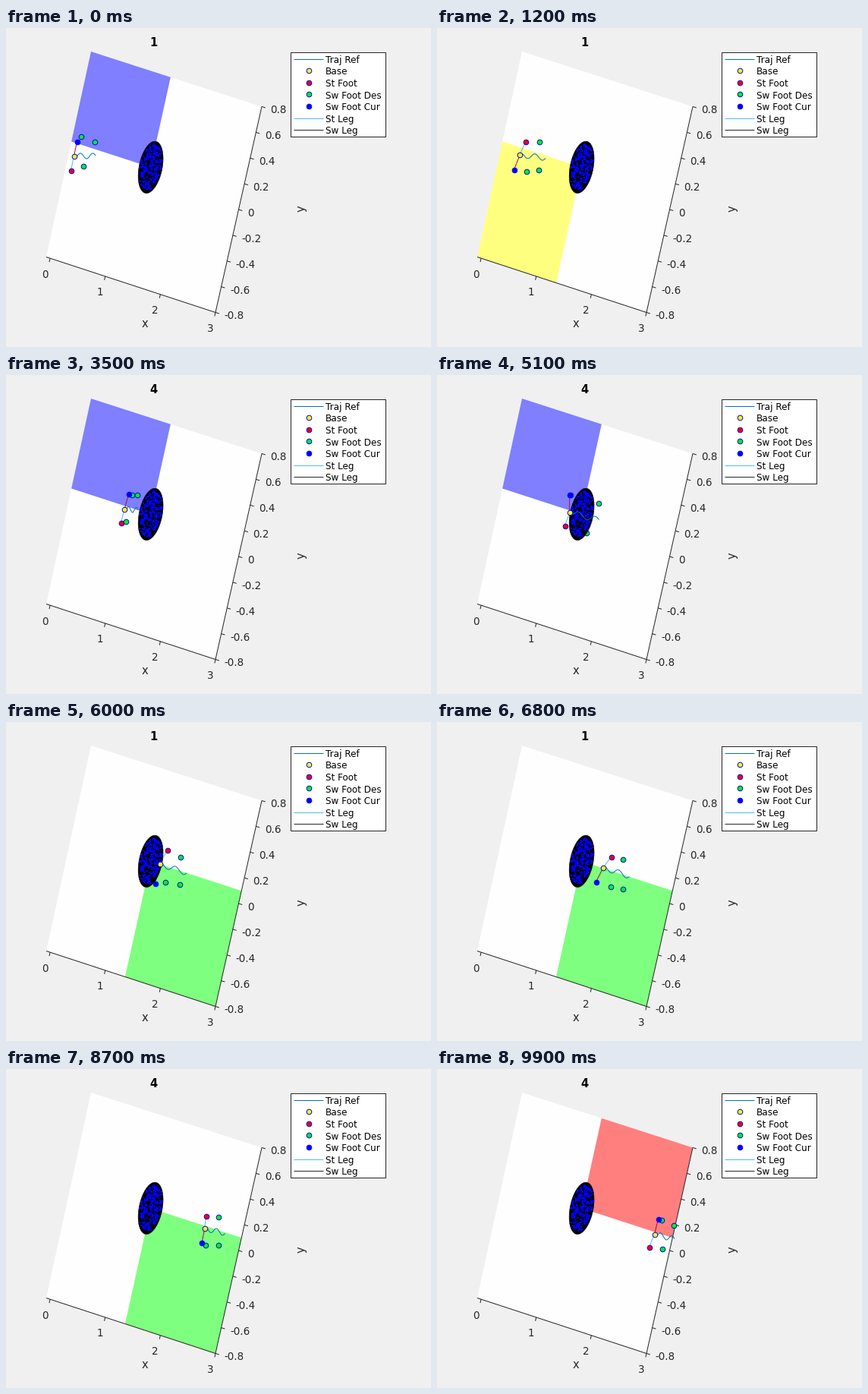
Write a matplotlib script that moves like this. It is 560 px wide and 420 px high and loops after 10 s.

```python
import numpy as np
import matplotlib.pyplot as plt
from matplotlib.animation import FuncAnimation
from matplotlib.patches import Polygon, Rectangle

W, H, DPI = 560, 420, 100
PT = 72 / DPI  # points per pixel
FRAMES, PHASES = 100, 4

plt.rcParams["font.family"] = "DejaVu Sans"
fig = plt.figure(figsize=(W / DPI, H / DPI), dpi=DPI, facecolor="#f0f0f0")
ax = fig.add_axes([0, 0, 1, 1])
ax.set_xlim(0, W)
ax.set_ylim(H, 0)
ax.axis("off")

INK = "#262626"
TRAJ, ST_LEG, SW_LEG = "#0072bd", "#4dbeee", "#a2142f"

# Ground plane corners on the stage
BL, BR, TR, TL = map(np.array, [(53, 301.5), (276, 374.5), (337, 103.5), (112, 31)])
SPLIT_U, SPLIT_V = 0.466, 0.562


def plane(u, v):
    return (1 - v) * ((1 - u) * BL + u * BR) + v * ((1 - u) * TL + u * TR)


def quad(u0, u1, v0, v1):
    return [plane(u0, v0), plane(u1, v0), plane(u1, v1), plane(u0, v1)]


def line(pts, color, lw=1.0, z=2):
    return ax.plot(*np.transpose(pts), color=color, lw=lw * PT, zorder=z,
                   solid_capstyle="butt")[0]


def text(x, y, s, px, ha="center", **kw):
    return ax.text(x, y + 0.365 * px, s, fontsize=px * PT, ha=ha,
                   va="baseline", color=kw.pop("color", INK), **kw)


def dots(color, z, xy=((0, 0),)):
    x, y = np.transpose(xy)
    return ax.plot(x, y, "o", ms=6.6 * PT, mfc=color, mec="#0000ff",
                   mew=1.0 * PT, zorder=z)[0]


# Ground, axes and ticks
ax.add_patch(Polygon(quad(0, 1, 0, 1), fc="#fefefe", ec="none", zorder=0))
region = ax.add_patch(Polygon(quad(0, 1, 0, 1), ec="none", zorder=1))
line([BL, BR, TR], INK)
for x in range(4):
    p = plane((x + 0.07) / 3.07, 0)
    line([p, p + (-1.1, 4.9)], INK)
    text(p[0] - 7, p[1] + 20.5, str(x), 13.5)
for n in range(-4, 5):
    p = plane(1, (n + 4) / 8)
    line([p, p + (4.8, 1.5)], INK)
    text(p[0] + 11.5, p[1] + 4, f"{n / 5:g}", 13.5, ha="left")
text(183, 388.5, "x", 14.7)
ax.text(389, 238, "y", fontsize=14.7 * PT, rotation=90, ha="center",
        va="center", color=INK)
title = text(194, 19, "1", 14.7, weight="bold", color="black")

# Meshed ball seen from above
center = plane(SPLIT_U, SPLIT_V)
EX, EY = np.array([14.6, 4.7]), np.array([7.6, -33.9])


def disc(r, a):
    return center + np.outer(r * np.cos(a), EX) + np.outer(r * np.sin(a), EY)


rng = np.random.default_rng(5)
ring = disc(np.ones(60), np.linspace(0, 2 * np.pi, 60))
ax.add_patch(Polygon(ring, fc="black", ec="black", lw=0.5 * PT, zorder=5))
spots = disc(0.9 * np.sqrt(rng.random(210)), 2 * np.pi * rng.random(210))
ax.scatter(*spots.T, s=(rng.uniform(1.5, 3.2, 210) * PT) ** 2, marker="s",
           c="#0000ff", linewidths=0, zorder=5.1)

# Legend
ax.add_patch(Rectangle((374.5, 31.5), 125, 111, fc="white", ec=INK, lw=PT, zorder=8))
ENTRIES = [("Traj Ref", TRAJ, 0), ("Base", "yellow", 1), ("St Foot", "red", 1),
           ("Sw Foot Des", "lime", 1), ("Sw Foot Cur", "blue", 1),
           ("St Leg", ST_LEG, 0), ("Sw Leg", INK, 0)]
for n, (name, color, is_dot) in enumerate(ENTRIES):
    y = 40.5 + 15.6 * n
    if is_dot:
        dots(color, 9, [(398.5, y)])
    else:
        line([(379, y), (418, y)], color, z=9)
    text(421, y + 1, name, 12, ha="left", color="black", zorder=9)

# Footholds, upper and lower in turn; the first two are the starting pose
HOLDS = np.array([
    (93, 149), (85, 187), (98, 142), (101, 186), (116, 149), (117, 188),
    (134, 149), (133, 189), (150, 153), (151, 194), (165, 157), (157, 197),
    (172, 157), (168, 198), (175, 157), (196, 212), (212, 168), (209, 210),
    (229, 177), (228, 216), (244, 180), (244, 222), (263, 193), (262, 231),
    (279, 194), (279, 234), (295, 198), (296, 241), (311, 205)], float) + 0.5
CROSSING = 13  # first step on the far side
LEAD_T = [0, 24, 35, 51, 60, 76, 99]
LEAD_X = [0, 0.5, -0.5, 3, -2, 1, 1]
LEAD_Y = [0, 2, 1, 3, 3.5, 1, 1.5]

st_leg = line([(0, 0), (0, 0)], ST_LEG, z=3)
sw_leg = line([(0, 0), (0, 0)], SW_LEG, z=3)
st_foot = dots("red", 4)
des_feet = dots("lime", 4.1)
sw_foot = dots("blue", 4.2)
traj = line([(0, 0), (0, 0)], TRAJ, z=6)
base_dot = dots("yellow", 6.1)
u = np.linspace(0, 1, 50)
SWAY = 3.6 * np.minimum(1, 6 * u) * np.sin(2 * np.pi * u / 0.57 - 1.74)


def place(artist, pts):
    artist.set_data(*np.transpose(pts))


def update(i):
    step, phase = divmod(i, PHASES)
    upper = step % 2 == 0  # the upper foot swings
    far = step >= CROSSING
    side = 1 if upper else -1

    old, stance, target = HOLDS[step:step + 3]
    swing = old + (target - old) * phase / PHASES
    lead = np.interp(i, LEAD_T, LEAD_X), side * np.interp(i, LEAD_T, LEAD_Y)
    base = (stance + swing) / 2 + lead

    plan = HOLDS[step + 2:step + 5].copy()
    if upper:
        plan[1, 1] -= 5
    else:
        plan[2, 1] -= 3
    end = plan[1:].mean(axis=0) + (9, 3)
    path = base + np.outer(u, end - base)
    path[:, 1] -= side * SWAY

    place(traj, path)
    place(base_dot, [base])
    place(st_foot, [stance])
    place(des_feet, plan)
    place(sw_foot, [swing])
    place(st_leg, [base, stance])
    place(sw_leg, [base, swing])

    us = (SPLIT_U, 1) if far else (0, SPLIT_U)
    vs = (SPLIT_V, 1) if upper else (0, SPLIT_V)
    region.set_xy(quad(*us, *vs))
    colors = ("#7fff7f", "#ff7f7f") if far else ("#ffff7f", "#7f7fff")
    region.set_facecolor(colors[upper])
    title.set_text(str(phase + 1))
    return []


anim = FuncAnimation(fig, update, frames=FRAMES, interval=100, repeat=True,
                     repeat_delay=0, blit=False)
plt.show()
```
